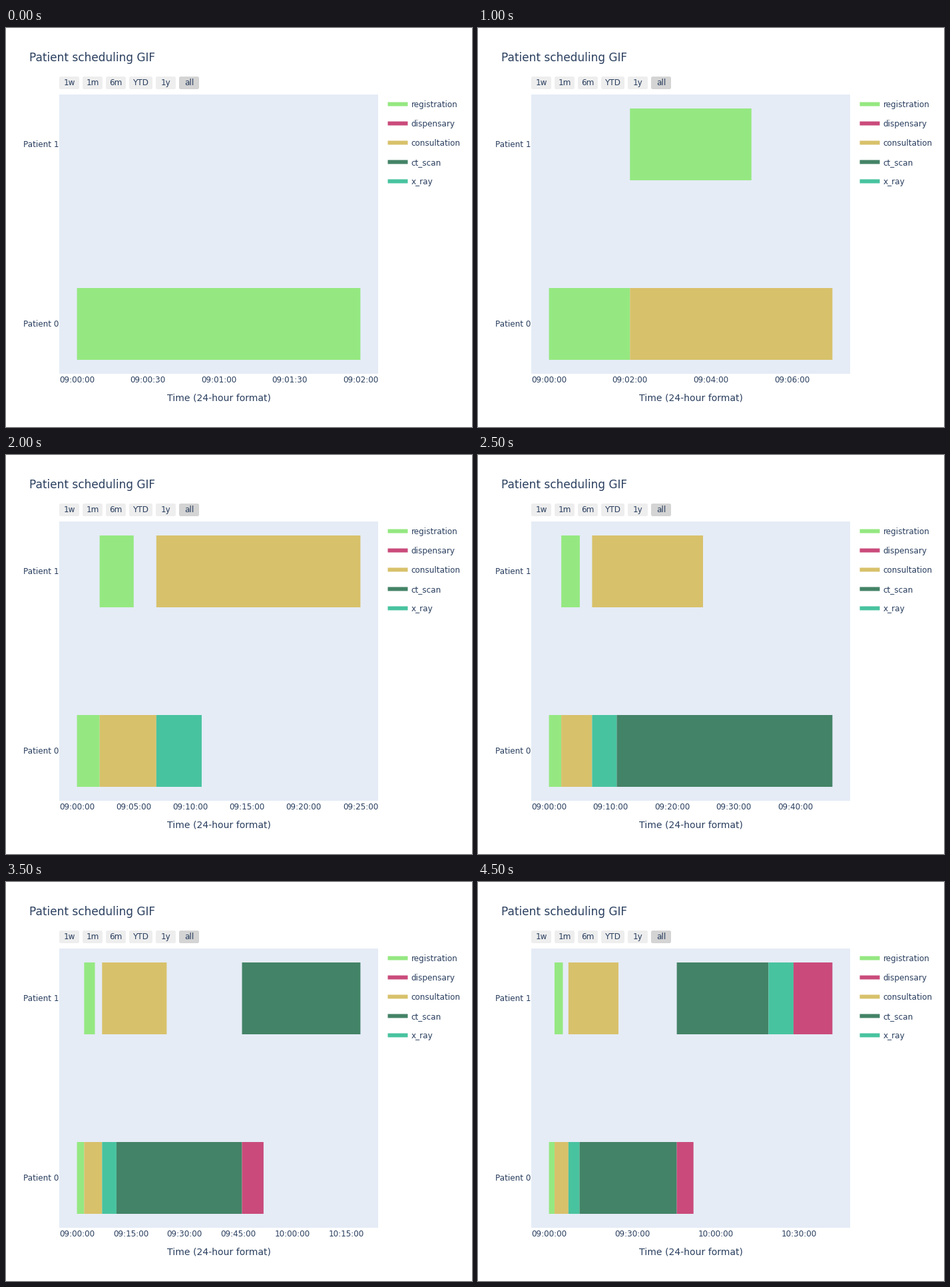
A matplotlib script that plays this animation: 700 by 600 pixels, repeating every 5 s.

```python
import matplotlib.pyplot as plt
from matplotlib.animation import FuncAnimation
from matplotlib.patches import FancyBboxPatch, Rectangle

plt.rcParams["font.family"] = "DejaVu Sans"

W, H, DPI = 700, 600, 100
LEFT, RIGHT, TOP, BOTTOM = 80, 559, 100, 520
PAD = (RIGHT - LEFT) / 18
INK = "#2a3f5f"
COLORS = {
    "registration": "#95e881",
    "dispensary": "#ca4b7b",
    "consultation": "#d8c16b",
    "ct_scan": "#438367",
    "x_ray": "#48c39f",
}
ROW_Y = (445, 175)
STEPS = (0.5, 1, 2, 5, 10, 15, 30)

# patient, task, start and end in minutes after 09:00
TASKS = [
    (0, "registration", 0, 2),
    (1, "registration", 2, 5),
    (0, "consultation", 2, 7),
    (1, "consultation", 7, 25),
    (0, "x_ray", 7, 11),
    (0, "ct_scan", 11, 46),
    (1, "ct_scan", 46, 79),
    (0, "dispensary", 46, 52),
    (1, "x_ray", 79, 88),
    (1, "dispensary", 88, 102),
]

fig = plt.figure(figsize=(W / DPI, H / DPI), dpi=DPI, facecolor="white")
ax = fig.add_axes([0, 0, 1, 1])
ax.set_xlim(0, W)
ax.set_ylim(H, 0)
ax.axis("off")


def box(x, y, w, h, color):
    return ax.add_patch(Rectangle((x, y), w, h, fc=color, lw=0, snap=False))


def label(x, y, text, size=12, ha="left"):
    return ax.text(x, y, text, fontsize=size * 72 / DPI, color=INK,
                   ha=ha, va="baseline")


def draw_static():
    box(LEFT, TOP, RIGHT - LEFT, BOTTOM - TOP, "#e5ecf6")
    label(35, 50, "Patient scheduling GIF", 17)
    label((LEFT + RIGHT) / 2, 561, "Time (24-hour format)", 14, "center")
    for i, y in enumerate(ROW_Y):
        label(79, y + 4, f"Patient {i}", ha="right")

    x = LEFT
    for name in ("1w", "1m", "6m", "YTD", "1y", "all"):
        w = 35 if name == "YTD" else 30
        fill = "#d4d4d4" if name == "all" else "#eeeeee"
        ax.add_patch(FancyBboxPatch(
            (x, 73), w, 19, boxstyle="round,pad=0,rounding_size=2.5",
            fc=fill, lw=0))
        label(x + w / 2, 86, name, ha="center")
        x += w + 5

    for i, (name, color) in enumerate(COLORS.items()):
        y = 114.5 + 29 * i
        box(573.5, y - 3, 30, 6, color)
        label(608.5, y + 4.5, name)


def clock(minutes):
    s = round(minutes * 60)
    return f"{9 + s // 3600:02d}:{s // 60 % 60:02d}:{s % 60:02d}"


draw_static()
moving = []


def update(n):
    while moving:
        moving.pop().remove()
    shown = TASKS[:n + 1]
    span = max(end for *_, end in shown)
    scale = (RIGHT - LEFT - 2 * PAD) / span
    x0 = LEFT + PAD

    for row, name, start, end in shown:
        moving.append(box(x0 + start * scale, ROW_Y[row] - 54,
                          (end - start) * scale, 108, COLORS[name]))

    step = next(s for s in STEPS if span / s <= 6)
    t = 0
    while x0 + t * scale <= RIGHT:
        moving.append(label(x0 + t * scale, 533, clock(t), ha="center"))
        t += step
    return moving


anim = FuncAnimation(fig, update, frames=len(TASKS), interval=500,
                     repeat=True, repeat_delay=0, blit=False)
plt.show()
```
